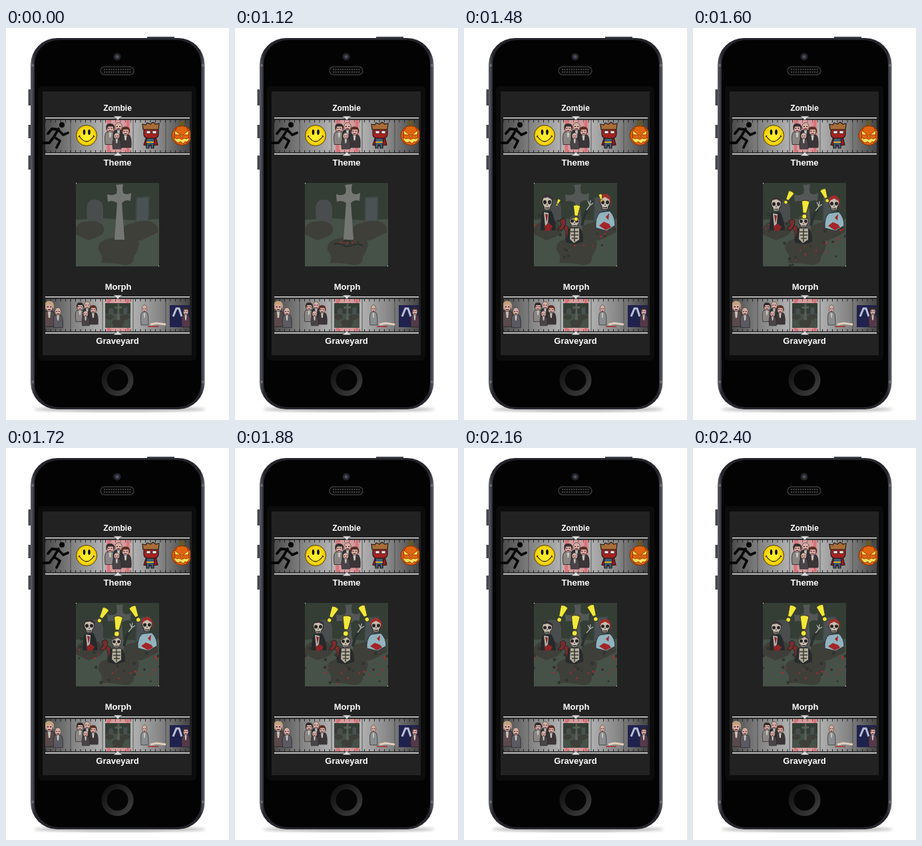
An HTML page that plays this animation: 335x587 px, repeating every 2720 ms.

```html
<!DOCTYPE html>
<html lang="en">
<head>
<meta charset="utf-8">
<title>Zombie theme</title>
<style>
  html, body { margin: 0; width: 100%; height: 100%; overflow: hidden; background: #fff; }
  svg { display: block; width: 335px; height: 587px; }
  text { font: bold 13px "Liberation Sans", Arial, sans-serif; fill: #fff; text-anchor: middle; }
</style>
</head>
<body>
<svg viewBox="0 0 335 587">
  <defs>
    <linearGradient id="metal">
      <stop offset="0" stop-color="#4c4c4c"/><stop offset=".2" stop-color="#858585"/>
      <stop offset=".5" stop-color="#c8c8c8"/><stop offset=".8" stop-color="#858585"/>
      <stop offset="1" stop-color="#444"/>
    </linearGradient>
    <linearGradient id="edge">
      <stop offset="0" stop-color="#5d5f6a"/><stop offset=".025" stop-color="#25262c"/>
      <stop offset=".975" stop-color="#25262c"/><stop offset="1" stop-color="#626571"/>
    </linearGradient>
    <linearGradient id="homeRing" x2="1" y2="1">
      <stop offset="0" stop-color="#0b0b0b"/><stop offset=".6" stop-color="#2b2b2c"/><stop offset="1" stop-color="#444"/>
    </linearGradient>
    <radialGradient id="sun"><stop offset=".3" stop-color="#ffed2c"/><stop offset="1" stop-color="#f2c800"/></radialGradient>
    <filter id="soft"><feGaussianBlur stdDeviation="2"/></filter>
    <clipPath id="stageClip"><rect x="105" y="232" width="125" height="125"/></clipPath>
    <clipPath id="reelClip"><rect x="59" y="0" width="218" height="60"/></clipPath>

    <g id="reel">
      <rect x="59" y="3" width="217" height="50" fill="url(#metal)"/>
      <path d="M97 3v50M145 3v50M191 3v50M240 3v50" stroke="#444" stroke-width=".8"/>
      <path d="M59 5.5H276M59 51H276" stroke="#222" stroke-width="4" stroke-dasharray="1 6.5"/>
      <path d="M59 3H276M59 53H276" stroke="#222" stroke-width="1.5"/>
      <rect x="150" y="4" width="37" height="48" fill="#ee7a80" opacity=".5"/>
      <path d="M154 4v48M183 4v48" stroke="#e0505a" stroke-width="4" opacity=".5"/>
      <path d="M59 .8H276M59 54.6H276" stroke="#ddd" stroke-width="1.6"/>
      <path d="M161.500-2h13l-6.500 6zM161.500 57.500h13l-6.500-6z" fill="#ddd" stroke="#444" stroke-width=".7"/>
    </g>

    <g id="person">
      <path d="M-7 32Q-9 14-5 11H5Q9 14 8 32Z" fill="currentColor" stroke="#222" stroke-width=".8"/>
      <path d="M-2 11h4l-1 9h-2z" fill="#c8c5bd"/>
      <ellipse cy="5" rx="5" ry="6.500" fill="#d4b0a2" stroke="#333" stroke-width=".7"/>
      <path d="M-3 5h2M1 5h2M-2 9h4" stroke="#402" stroke-width="1.200"/>
    </g>
    <path id="hair" d="M-5 9Q-8-3 0-3 8-3 6 9L4 2H-3Z"/>
    <g id="family">
      <use href="#person" x="-11" y="3" color="#8a8684"/>
      <use href="#hair" x="-11" y="3" fill="#332b2a"/>
      <use href="#person" x="1" y="0" color="#303338"/>
      <use href="#person" x="11" y="8" color="#3c3538"/>
      <use href="#hair" x="11" y="8" fill="#5b2f26"/>
      <use href="#person" x="-2" y="17" color="#4a4448" transform="scale(.8) translate(0 4)"/>
    </g>

    <path id="cross" d="M163 317L167 262Q161 257 153 260L152 249Q160 252 166 248 168 241 165 235L176 234Q174 242 176 247 181 251 188 247L187 259Q180 256 174 262L178 317Z"/>
    <g id="graveyard">
      <rect x="105" y="232" width="125" height="125" fill="#343e35"/>
      <path d="M105 287L145 285 195 288 230 286V357H105Z" fill="#465148"/>
      <path d="M122 293L121 270Q122 257 133 257 145 257 146 270V293Z" fill="#4a4d4d"/>
      <path d="M195 292L196 254 215 253 214 292Z" fill="#4a5253" stroke="#3d4747" stroke-width="2"/>
      <path d="M105 300Q111 288 122 290 139 286 146 297 150 307 139 312L124 318 105 309Z
        M174 304Q178 293 191 292 205 286 218 290 231 296 228 306 215 313 203 318 187 320 174 312Z
        M139 333Q137 321 149 317 163 311 177 315 194 312 200 322 199 334 192 342 193 355 178 355 157 351 143 352 147 341 139 333Z" fill="#3e3f38"/>
    </g>

    <g id="skull">
      <path d="M-7.500-2Q-7-9 0-9 7-9 7.500-2 7.500 2 5 4L4 8H-4L-5 4Q-7.500 2-7.500-2Z" fill="#c6bcae" stroke="#242424"/>
      <path d="M-6-1a2.500 2.500 0 1 0 5 0 2.500 2.500 0 1 0-5 0M1-1a2.500 2.500 0 1 0 5 0 2.500 2.500 0 1 0-5 0M-1 3l1-2 1 2zM-3 5h6v2h-6z" fill="#262423"/>
      <path d="M-1.500 4v4M1 4v4" stroke="#c8beb0" stroke-width=".8"/>
    </g>
    <g id="leftZombie">
      <path d="M115 303Q115 288 118 280L131 279Q137 288 138 303Z" fill="#26292b"/>
      <path d="M120 281l7 1-1 12-4 5z" fill="#b8b3a9"/>
      <path d="M122 283l4 1-2 10M121 298l6-4 6 4-3 5-8 1z" fill="#8b2427"/>
      <path d="M141 302L146 296 144 291 149 288 153 291 152 297 147 303Z" fill="#792d2e" stroke="#292525"/>
      <use href="#skull" x="125" y="270"/>
      <path d="M117 270Q116 260 126 260 134 261 134 267L126 263 119 264Z" fill="#3a3232"/>
    </g>
    <g id="rightZombie">
      <path d="M177 297L181 283 187 275" fill="none" stroke="#2b3031" stroke-width="4"/>
      <path d="M184 277L189 271 186 265M189 271L190 264M189 271L194 268" fill="none" stroke="#2b3031" stroke-width="3"/>
      <path d="M184 277L189 271 186 265M189 271L190 264M189 271L194 268" fill="none" stroke="#a5aaa0" stroke-width="1.500"/>
      <path d="M198 300Q197 286 204 280L219 278Q227 285 227 297L214 304Z" fill="#91b4bf" stroke="#293338"/>
      <path d="M209 282l4 4 5-5-1 9zM203 297l7-5 8 3 3 4-8 4z" fill="#a32529"/>
      <use href="#skull" x="212" y="268"/>
      <path d="M204 268Q202 256 213 256 222 257 221 274L219 264 212 260 206 263Z" fill="#a12d29"/>
    </g>
    <g id="midZombie">
      <path d="M153 321Q152 304 159 299L173 299Q180 304 179 320L166 324Z" fill="#272b2d"/>
      <path d="M160 300L173 300 173 317 165 322 159 316Z" fill="#b3ad9a"/>
      <path d="M160 305H172M161 310H172M162 315H171M166 300V320" stroke="#383a36" stroke-width="1.500"/>
      <path d="M153 317L153 305 150 300 152 295 157 298 156 306" fill="#7f2b2c" stroke="#292525"/>
      <use href="#skull" x="166" y="290"/>
      <path d="M158 288Q158 279 167 280 174 281 174 288L168 283Z" fill="#4b4942"/>
    </g>
    <g id="bang">
      <path d="M-5.500-24Q0-27 5.500-24L2.500-8H-2.500Z" fill="#f1e83a" stroke="#413f20"/>
      <circle cy="-3" r="3.300" fill="#f1e83a" stroke="#413f20"/>
    </g>
  </defs>

  <!-- Phone -->
  <ellipse cx="171" cy="571" rx="129" ry="4" fill="#888" opacity=".6" filter="url(#soft)"/>
  <path d="M35.500 92V116M35.500 145V165M35.500 191V212" stroke="#44464f" stroke-width="4"/>
  <path d="M212 14.500H253" stroke="#44464f" stroke-width="3"/>
  <rect x="37" y="15" width="261.500" height="556" rx="40" fill="url(#edge)"/>
  <rect x="43" y="18" width="250" height="550" rx="36" fill="#030303"/>
  <path d="M38 56h4M38 530h4M294 56h4M294 530h4" stroke="#888" stroke-width="4" opacity=".5"/>
  <circle cx="167" cy="43" r="5.500" fill="#26262a"/><circle cx="167" cy="43" r="2.500" fill="#485062"/>
  <rect x="142" y="58" width="50" height="12" rx="6" fill="#090909" stroke="#39393b" stroke-width="1.500"/>
  <path d="M147 62H188M147 66H188" stroke="#444" stroke-width="2" stroke-dasharray="2 1.500"/>
  <rect x="48" y="87" width="238" height="411" rx="6" fill="#0c0c0c"/>
  <rect x="55" y="95" width="224" height="395" fill="#222"/>
  <circle cx="167.500" cy="527" r="24" fill="url(#homeRing)"/>
  <circle cx="167.500" cy="527" r="16" fill="#050505"/>

  <text x="167.500" y="124" style="font-size:12px">Zombie</text>
  <text x="167.500" y="206">Theme</text>
  <text x="168.500" y="392">Morph</text>
  <text x="167.500" y="473">Graveyard</text>

  <!-- Theme reel -->
  <g transform="translate(0 134)">
    <use href="#reel"/>
    <circle cx="84" cy="11" r="4"/>
    <path d="M79 17L72 29 81 35 76 45M72 29L65 38 56 38M78 18L69 17 63 24M80 20L86 26 93 23" fill="none" stroke="#050505" stroke-width="3.800" stroke-linecap="round" stroke-linejoin="round"/>
    <circle cx="121" cy="27" r="15.500" fill="url(#sun)" stroke="#47400a"/>
    <ellipse cx="117.500" cy="22" rx="1.800" ry="4"/><ellipse cx="125" cy="22" rx="1.800" ry="4"/>
    <path d="M110 28Q121 44 132 28M109 29l2-2M131 27l2 2" fill="none" stroke="#332c00" stroke-width="1.300"/>
    <use href="#family" transform="translate(168 9) scale(1.050 .9)"/>
    <g stroke="#241a1a" stroke-width="1.200">
      <path d="M211 29L207 41 214 43 228 41 225 29Z" fill="#9d1717"/>
      <path d="M211 31H223L222 40V46H218V41H215V46H211Z" fill="#3c5f78"/>
      <rect x="207" y="14" width="22" height="17" rx="6" fill="#a52320"/>
      <path d="M206 18L205 10 210 11 212 8 217 10 221 7 225 10 230 9 229 18Z" fill="#a86d38"/>
      <path d="M211 20h6v4h-6zM220 20h6v4h-6z" fill="#eee" stroke-width=".7"/>
      <path d="M211 37h11" stroke="#d5aa27" stroke-width="2"/>
    </g>
    <g clip-path="url(#reelClip)">
      <path d="M262 15L260 6 266 4 268 15" fill="#6a5a20"/>
      <ellipse cx="264" cy="27" rx="15" ry="14.500" fill="#e0650f" stroke="#792c06"/>
      <path d="M257 14Q249 27 257 40M271 14Q279 27 271 40" fill="none" stroke="#b23d06" stroke-width="1.500"/>
      <path d="M253 19L262 26 254 26ZM275 19L266 26 274 26ZM264 26l2 3h-4zM252 30L257 32 260 31 264 33 268 31 271 32 276 30Q273 39 269 36L266 39 262 36 259 38Q254 37 252 30Z" fill="#ffe05a" stroke="#8b2a07" stroke-width=".8"/>
    </g>
  </g>

  <!-- Morph reel -->
  <g transform="translate(0 402)">
    <use href="#reel"/>
    <g clip-path="url(#reelClip)">
      <g transform="translate(65 10) scale(1.100)"><use href="#person" color="#5a4a4c"/><use href="#hair" fill="#c2a27e"/></g>
      <use href="#person" transform="translate(78 18) scale(.9)" color="#5b5a63"/>
    </g>
    <use href="#family" transform="translate(121 9) scale(.9 .82)"/>
    <g transform="translate(149 10) scale(.304 .296) translate(-105 -232)">
      <use href="#graveyard"/><use href="#cross" fill="#596058"/>
    </g>
    <use href="#person" transform="translate(208 14) scale(.72 .9)" color="#8a8e90"/>
    <path d="M217 42L226 40 240 42" stroke="#e2cfbf" stroke-width="3" fill="none"/>
    <path d="M213 45h16" stroke="#a72b2b" stroke-width="1.500"/>
    <rect x="246" y="13" width="30" height="33" fill="#20224e"/>
    <path d="M251 30L256 18 260 18 264 30" fill="none" stroke="#bac0d4" stroke-width="3"/>
    <g clip-path="url(#reelClip)"><g transform="translate(270 18) scale(.8 .87)"><use href="#person" color="#54394a"/><use href="#hair" fill="#33282c"/></g></g>
  </g>

  <!-- Stage -->
  <g clip-path="url(#stageClip)">
    <use href="#graveyard"/>
    <use href="#cross" fill="#535756"/>
    <use id="litCross" href="#cross" fill="#747674"/>
    <path id="crack" d="M148 324Q157 321 162 325T177 325T192 327" fill="none" stroke="#252a27" stroke-width="1.500"/>
    <g id="specks"></g>
    <use id="left" href="#leftZombie"/>
    <use id="right" href="#rightZombie"/>
    <use id="mid" href="#midZombie"/>
    <use id="bangLeft" href="#bang"/>
    <use id="bangMid" href="#bang"/>
    <use id="bangRight" href="#bang"/>
    <path d="M105 232h1v1h-1zM229 356h1v1h-1z" fill="#fff"/>
  </g>
</svg>
<script>
const LOOP = 2720;
const $ = id => document.getElementById(id);
const clamp = v => Math.max(0, Math.min(1, v));

// Keys are rows of [time, ...values].
function tween(keys, t) {
  if (t <= keys[0][0]) return keys[0].slice(1);
  const i = keys.findIndex(k => k[0] > t);
  if (i < 0) return keys.at(-1).slice(1);
  const a = keys[i - 1], b = keys[i], u = (t - a[0]) / (b[0] - a[0]);
  return a.slice(1).map((v, n) => v + (b[n + 1] - v) * u);
}

// Keys hold the vertical stretch from the ground up.
const zombies = [
  { id: "left", x: 124, base: 303, keys: [[1320, 0], [1440, 1.26], [1480, 1.24], [1720, 1.08], [2040, 1]] },
  { id: "right", x: 212, base: 304, keys: [[1160, 0], [1280, 1.17], [1480, 1.16], [1720, 1.06], [2040, 1]] },
  { id: "mid", x: 165, base: 324, keys: [[1160, 0], [1320, 0.95], [1480, 1], [1720, 0.97], [2040, 1]] }
];

// Values: x, y, rotation, scale.
const bangs = {
  bangLeft: [[1440, 137, 265, 20, 0], [1480, 139, 266, 25, 0.4], [1640, 138, 262, 31, 0.95], [1720, 139, 261, 29, 0.95], [2040, 142, 260, 22, 1], [2400, 142, 260, 21, 1]],
  bangMid: [[1240, 166, 300, 0, 0], [1320, 167, 298, 10, 0.45], [1480, 168, 289, 4, 0.95], [1720, 166, 282, 6, 1.2], [2040, 166, 281, 4, 1.2], [2400, 166, 281, 3, 1.2]],
  bangRight: [[1440, 209, 261, -8, 0], [1480, 207, 260, -12, 0.45], [1640, 201, 261, -25, 0.95], [1720, 200, 260, -25, 1], [2040, 199, 259, -22, 1], [2400, 199, 259, -21, 1]]
};

const crossLight = [[1120, 1], [1320, 0]];

let seed = 7;
const random = () => (seed = seed * 16807 % 2147483647) / 2147483647;
const mounds = [[168, 324, 1080], [210, 302, 1160], [125, 300, 1280]];
const specks = Array.from({ length: 42 }, (_, i) => {
  const [x, y, start] = mounds[i % 3];
  const red = i % 5 < 2;
  const node = document.createElementNS($("specks").namespaceURI, "circle");
  node.setAttribute("r", red ? 0.9 + random() * 0.8 : 1 + random() * 1.8);
  node.setAttribute("fill", red ? "#ae2b2e" : "#30352f");
  $("specks").append(node);
  return { node, x: x + (random() - 0.5) * 30, y, start, dx: (random() - 0.5) * 70, dy: random() * 40, lift: 30 + random() * 60 };
});

function draw(t) {
  $("litCross").setAttribute("opacity", tween(crossLight, t)[0]);
  $("crack").setAttribute("opacity", t >= 1120 && t < 1280 ? 1 : 0);

  for (const { id, x, base, keys } of zombies) {
    const [s] = tween(keys, t);
    $(id).setAttribute("transform", `translate(${x} ${base}) scale(${Math.min(1, 0.7 + s * 0.3)} ${s}) translate(${-x} ${-base})`);
  }
  for (const id in bangs) {
    const [x, y, angle, s] = tween(bangs[id], t);
    $(id).setAttribute("transform", `translate(${x} ${y}) rotate(${angle}) scale(${s})`);
  }
  for (const p of specks) {
    const u = clamp((t - p.start) / 560);
    p.node.setAttribute("cx", p.x + p.dx * u);
    p.node.setAttribute("cy", p.y + p.dy * u - p.lift * u * (1 - u));
    p.node.setAttribute("opacity", t >= Math.max(1120, p.start) ? 1 : 0);
  }
}

function frame() {
  const t = performance.now() % LOOP;
  const step = t < 2240 ? 40 : 80;
  draw(Math.floor(t / step) * step);
  requestAnimationFrame(frame);
}
frame();
</script>
</body>
</html>
```
